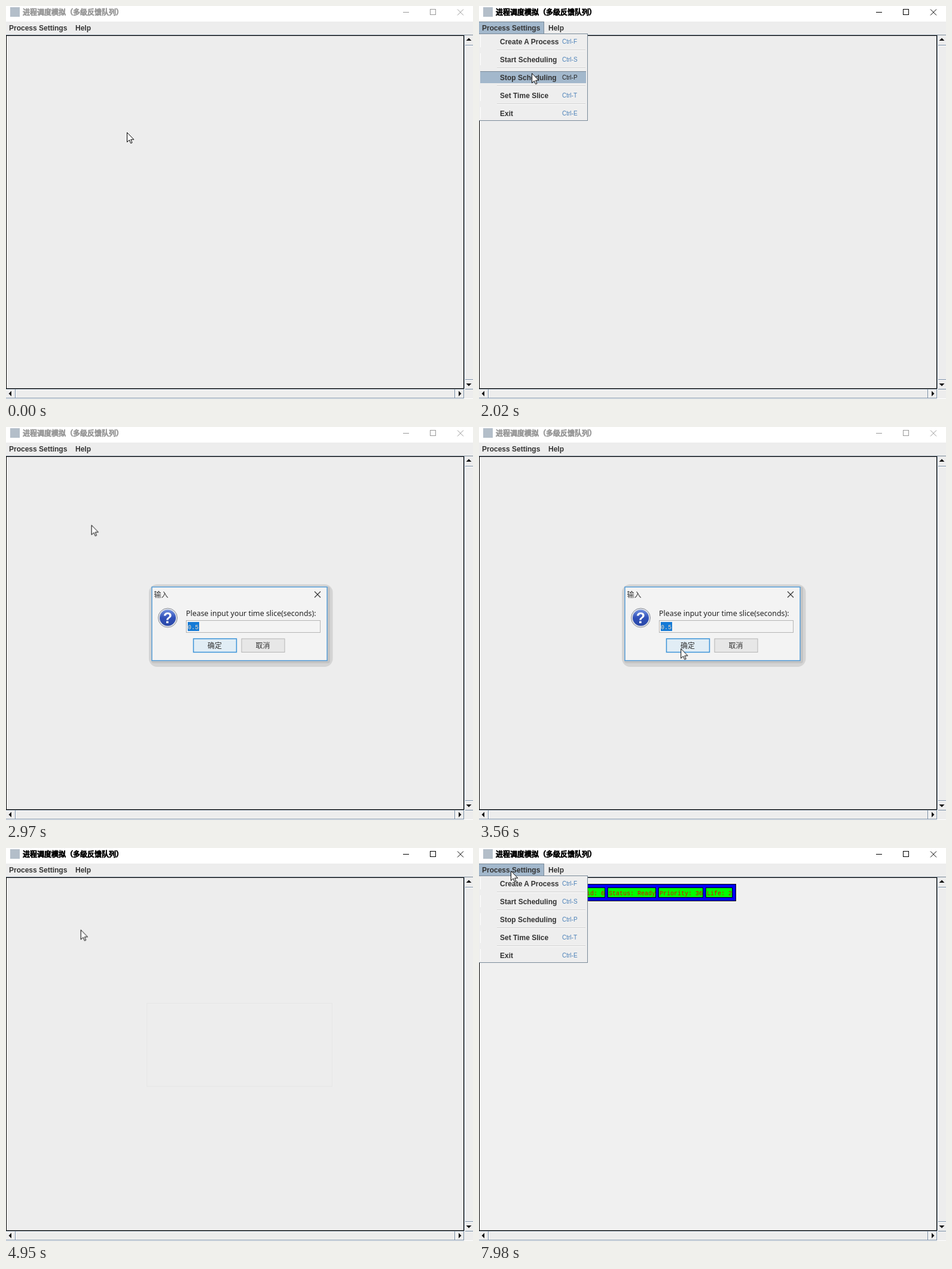
Write an HTML page that moves like this. It is 781x657 px and loops after 8000 ms.

```html
<!DOCTYPE html>
<html lang="zh">
<head>
<meta charset="utf-8">
<title>进程调度模拟</title>
<style>
  html, body { margin: 0; width: 100%; height: 100%; overflow: hidden; background: #ededed; }
  svg { display: block; width: 781px; height: 657px; }
  text { white-space: pre; fill: #333; }
  .cjk { font: 12px "Noto Sans CJK SC", "Noto Sans CJK", sans-serif; }
  .bold { font: bold 12px "Liberation Sans", Arial, sans-serif; }
  .accel { font: 10px "Liberation Sans", Arial, sans-serif; fill: #4a80b8; }
  .prompt { font: 12.4px "Noto Sans", sans-serif; fill: #222; }
  .mono { font: 10px "Liberation Mono", monospace; }
  .mid { text-anchor: middle; }
  .crisp { shape-rendering: crispEdges; }

  /* percentages are positions in the 8 s loop */
  .show { opacity: 0; animation: 8s step-end infinite; }
  .active { animation-name: active; }
  .inactive { animation-name: inactive; }
  .menu { animation-name: menu; }
  .row { animation-name: row; }
  .ghost { animation-name: ghost; }
  .before { animation-name: before; }
  .after { animation-name: after; }
  .hl0 { animation-name: create; }
  .hl1 { animation-name: start; }
  .hl2 { animation-name: stop; }
  .hl3 { animation-name: slice; }
  @keyframes active { 0% { opacity: 0 } 13.25% { opacity: 1 } 34.875% { opacity: 0 } 51.375%, 100% { opacity: 1 } }
  @keyframes inactive { 0% { opacity: 1 } 13.25% { opacity: 0 } 34.875% { opacity: 1 } 51.375%, 100% { opacity: 0 } }
  @keyframes menu { 0% { opacity: 0 } 16.375% { opacity: 1 } 34.875% { opacity: 0 } 71.25% { opacity: 1 } 86.375% { opacity: 0 } 96.625%, 100% { opacity: 1 } }
  @keyframes row { 0% { opacity: 0 } 86.375%, 100% { opacity: 1 } }
  @keyframes ghost { 0% { opacity: 0 } 51.5% { opacity: 1 } 86.375%, 100% { opacity: 0 } }
  @keyframes before { 0% { opacity: 1 } 51.375%, 100% { opacity: 0 } }
  @keyframes after { 0% { opacity: 0 } 51.375%, 100% { opacity: 1 } }
  @keyframes create { 0% { opacity: 0 } 17.15% { opacity: 1 } 21% { opacity: 0 } 78.625% { opacity: 1 } 86.375%, 100% { opacity: 0 } }
  @keyframes start { 0% { opacity: 0 } 21% { opacity: 1 } 24.875%, 100% { opacity: 0 } }
  @keyframes stop { 0% { opacity: 0 } 24.875% { opacity: 1 } 30%, 100% { opacity: 0 } }
  @keyframes slice { 0% { opacity: 0 } 30% { opacity: 1 } 34.875%, 100% { opacity: 0 } }

  .dialog { opacity: 0; transform-origin: 390.5px 329px; animation: dialog 8s linear infinite; }
  @keyframes dialog {
    0%, 35.25% { opacity: 0; transform: scale(.94) }
    37.1%, 51.5% { opacity: 1; transform: none }
    52.25% { opacity: .62; transform: scale(.98) }
    53.5%, 100% { opacity: 0; transform: scale(.95) }
  }
  .cursor { animation: cursor 8s linear infinite; }
  @keyframes cursor {
    0% { transform: translate(202px, 211px) }
    .375% { transform: translate(202px, 211px); animation-timing-function: ease-in-out }
    9%, 16.375% { transform: translate(77px, 43px) }
    25.25% { transform: translate(88px, 112px) }
    30.5%, 35.25% { transform: translate(93px, 142px) }
    37.125% { transform: translate(142px, 163px); animation-timing-function: ease-out }
    44.875% { transform: translate(338px, 371px) }
    47.5% { transform: translate(335px, 366px) }
    57.125% { transform: translate(335px, 366px); animation-timing-function: ease-in-out }
    61.875% { transform: translate(125px, 137px); animation-timing-function: ease-out }
    64.625%, 66.875% { transform: translate(82px, 61px) }
    70.875%, 76.625% { transform: translate(66px, 42px) }
    80.5%, 93.375% { transform: translate(62px, 56px) }
    96.625% { transform: translate(53px, 35px); animation-timing-function: step-end }
    99.75%, 100% { transform: translate(53px, 38px) }
  }
</style>
</head>
<body>
<svg viewBox="0 0 781 657">
  <defs>
    <linearGradient id="orb" x2="0" y2="1">
      <stop stop-color="#6f8fe0"/><stop offset=".5" stop-color="#3050b8"/><stop offset="1" stop-color="#2a48a8"/>
    </linearGradient>
    <g id="caption">
      <text class="cjk" x="28" y="15" style="fill:inherit">进程调度模拟（多级反馈队列）</text>
      <path class="crisp" fill="none" d="M664 10.5h10M709.5 5.5h9v9h-9z"/>
      <path fill="none" d="M755 5.5l10 10m0-10l-10 10"/>
    </g>
  </defs>

  <rect width="781" height="26" fill="#fff"/>
  <rect x="7" y="2" width="16" height="16" fill="#b3bec9"/>
  <g class="show inactive" fill="#999" stroke="none"><use href="#caption" stroke="#999" style="stroke-width:1" /></g>
  <g class="show active"><use href="#caption" fill="#000" stroke="#000"/></g>

  <g class="crisp">
    <rect y="26" width="781" height="631" fill="#ededed"/>
    <rect class="show row" x="1" y="50" width="764" height="589" fill="#f0f0f0"/>
    <path d="M0 48.5H781M766.5 49V640M0 640.5H766" stroke="#7a8a99"/>
    <path d="M.5 49.5h765v590H.5z" fill="none" stroke="#000"/>
    <path d="M767.5 50V640M768 66.5h13M768 625.5h13M0 641.5h766M16.5 642v13M752.5 642v13" stroke="#fff"/>
    <path d="M768 65.5h13M768 624.5h13M768 640.5h13M15.5 641v15M750.5 641v15M16 655.5H751M0 655.5H16M751 655.5h15M765.5 641v15" stroke="#7a8fa6"/>
    <path d="M0 656.5H781" stroke="#fff"/>
  </g>
  <path d="M769.5 58h9l-4.5-4.5zM769.5 631h9l-4.5 4.5zM9 643.5v9L4.500 648zM757 643.5v9l4.500-4.500z" fill="#111"/>

  <rect class="show ghost crisp" x="235.500" y="259.500" width="310" height="139" fill="none" stroke="#e6e6e6"/>

  <g class="show row" id="process">
    <rect class="crisp" x="167.500" y="60.500" width="262" height="28" fill="#00f" stroke="#000"/>
  </g>

  <g class="show menu" id="menu">
    <g class="crisp">
      <rect x="-.5" y="26.500" width="109" height="20" fill="#a3b8cc" stroke="#7a8a99"/>
      <rect x="-.5" y="46.500" width="182" height="145" fill="#eee" stroke="#7a8a99"/>
    </g>
  </g>
  <text class="bold" x="5" y="41">Process Settings</text>
  <text class="bold" x="116" y="41">Help</text>

  <g class="dialog">
    <g class="show before">
      <rect x="239" y="263" width="307.500" height="138" rx="14" fill="#d4d4d4"/>
      <rect x="243" y="267" width="299" height="128" rx="4" fill="#c4c4c4"/>
    </g>
    <g class="show after" fill="none" stroke="#000">
      <rect x="242" y="266" width="297" height="127" rx="3" stroke-width="3" opacity=".18"/>
      <rect x="241" y="265" width="300" height="130" rx="6" stroke-width="6" opacity=".1"/>
    </g>
    <rect x="244" y="267.500" width="293" height="123" fill="#f2f2f2"/>
    <rect x="244" y="267.500" width="293" height="26" fill="#f8f8f8"/>
    <rect class="show before" x="244" y="267.500" width="293" height="123" fill="#f3f3f3" stroke="#4596d8" stroke-width="1.300"/>
    <rect class="show after" x="244" y="267.500" width="293" height="123" fill="none" stroke="#999"/>
    <g class="show before">
      <text class="cjk" x="247.500" y="284.500">输入</text>
      <path d="M516 275l10 10m0-10l-10 10" stroke="#333" stroke-width="1.200"/>
    </g>
    <text class="cjk show after" x="247.500" y="284.500" style="fill:#999">输入</text>

    <circle cx="270.500" cy="319" r="16" fill="#dcdfe5" stroke="#8d919a"/>
    <circle cx="270.500" cy="319" r="13.500" fill="url(#orb)"/>
    <text class="bold mid" x="270.500" y="328" style="font-size:25px;fill:#fff">?</text>

    <text class="prompt" x="301" y="316">Please input your time slice(seconds):</text>
    <rect x="301.500" y="323.500" width="224" height="20" fill="#f4f4f4" stroke="#b5b5b5"/>
    <g class="show before">
      <rect x="304" y="326" width="19" height="15" fill="#147ad6"/>
      <text class="mono" x="304" y="338" style="fill:#f4dcc0">0.5</text>
    </g>
    <text class="mono show after" x="304" y="338">0.5</text>

    <rect x="313.500" y="354" width="72" height="22.500" fill="#e1edf5" stroke="#3a92d8" stroke-width="1.500"/>
    <rect class="show after" x="315.500" y="356" width="68" height="18.500" fill="#cce2f0" stroke="#333" stroke-dasharray="1 1"/>
    <rect x="394" y="354" width="72" height="22.500" fill="#e7e7e7" stroke="#b4b4b4"/>
    <text class="cjk mid" x="349" y="369.500">确定</text>
    <text class="cjk mid" x="429.500" y="369.500">取消</text>
  </g>

  <path class="cursor" d="M.5.5V16.500L4.300 13 6.700 18.500 9 17.500 6.700 12.200H11.800Z" fill="#fff" stroke="#000"/>
</svg>
<script>
  const label = (cls, x, y, text, fill) =>
    `<text class="${cls}" x="${x}" y="${y}"${fill ? ` style="fill:${fill}"` : ''}>${text}</text>`;

  const items = [['Create A Process', 'F'], ['Start Scheduling', 'S'], ['Stop Scheduling', 'P'], ['Set Time Slice', 'T'], ['Exit', 'E']];
  const menuItem = ([name, key], i) => {
    const y = 49 + 30 * i;
    const caption = label('bold', 35, y + 15, name);
    const accel = fill => label('accel', 139, y + 14, 'Ctrl-' + key, fill);
    const line = i < 4 ? `<path d="M30 ${y + 24.5}h148" stroke="#d0d0d0"/><path d="M30 ${y + 25.5}h148" stroke="#fff"/>` : '';
    const highlight = i < 4 ? `<g class="show hl${i}"><g class="crisp">
      <rect x="2" y="${y}" width="177" height="20" fill="#a3b8cc"/>
      <path d="M2 ${y + 10 - 9.5}h177" stroke="#7a8a99"/></g>${caption}${accel('#222')}</g>` : '';
    return `<g class="crisp"><path d="M2.5 ${y}v20" stroke="#fff"/>${line}</g>${caption}${accel()}${highlight}`;
  };
  document.getElementById('menu').insertAdjacentHTML('beforeend', items.map(menuItem).join(''));

  let x = 173;
  const cells = ['Pid: 6', 'Status: Ready', 'Priority: 36', 'Life: 2'].map(text => {
    const width = text.length * 6 + 2;
    const cell = `<rect class="crisp" x="${x - .5}" y="66.5" width="${width}" height="16" fill="#0f0" stroke="#000"/>`
      + label('mono', x + 1, 78.5, text, '#e00000');
    x += width + 5;
    return cell;
  });
  document.getElementById('process').insertAdjacentHTML('beforeend', cells.join(''));
</script>
</body>
</html>
```
